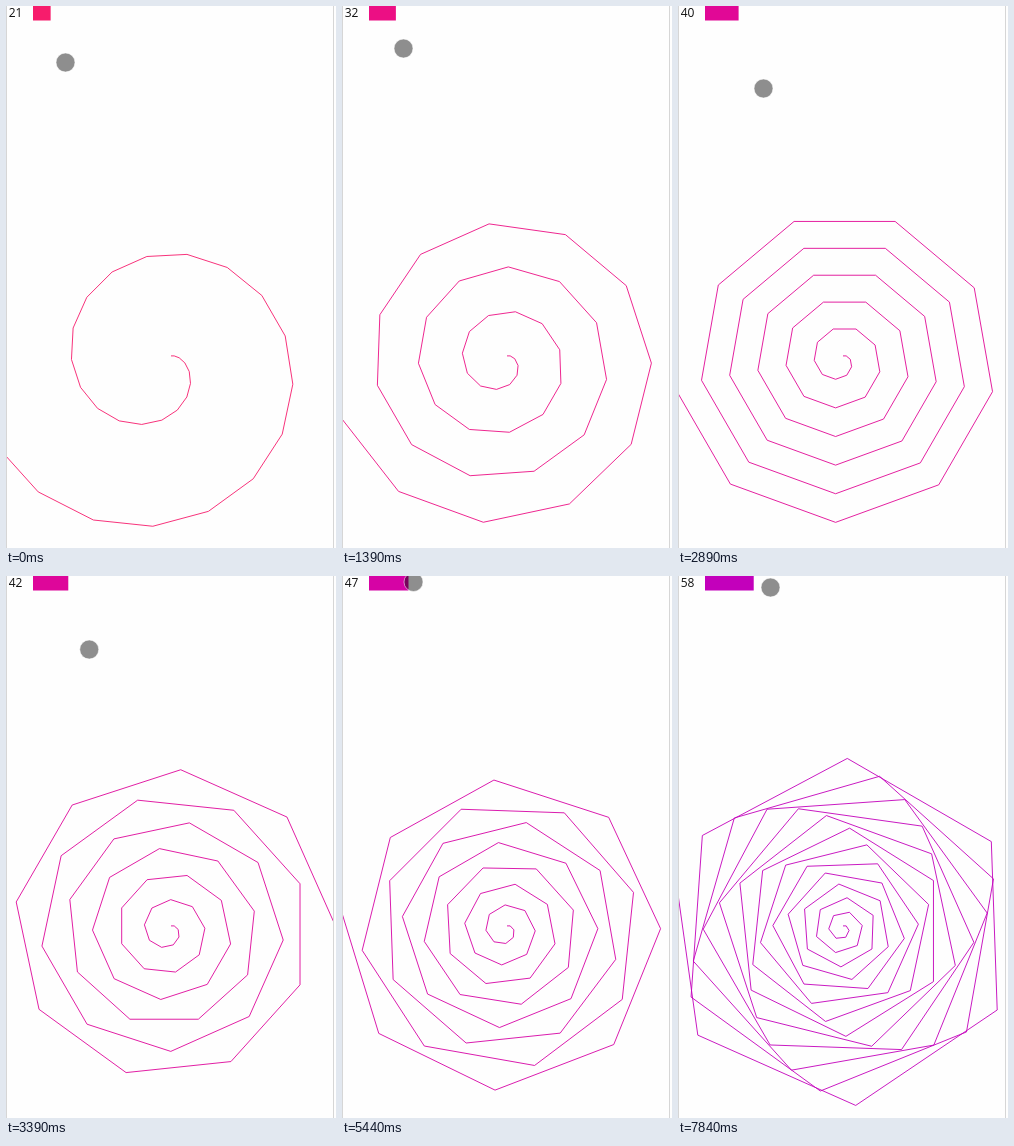
Write an HTML page with a canvas that moves like this. It is 330 px wide and 542 px high and loops after 8 s.

```html
<!DOCTYPE html>
<html>
<head>
<meta charset="utf-8">
<style>
  html, body { margin: 0; width: 100%; height: 100%; overflow: hidden; background: #fff; }
  canvas { display: block; }
</style>
</head>
<body>
<canvas id="stage" width="330" height="542"></canvas>
<script>
const ctx = document.getElementById('stage').getContext('2d');
const LOOP = 8000, STEP = 135, LEFT = 1, RIGHT = 327, HEIGHT = 542;
const START = { x: 165, y: 349.9 }, FIRST = 3.2, GROWTH = 2.175;

// Time (ms), turning angle, pointer x, y
const keys = [
  [0, 21, 59.5, 56.5],
  [120, 21, 66.5, 88],
  [260, 21, 66.5, 88],
  [1390, 32, 61.5, 42.5],
  [2080, 36, 60.5, 14.5],
  [2890, 40, 85.5, 82.5],
  [3940, 45, 79.5, 58.5],
  [4210, 47, 89, 74],
  [4610, 47, 89, 74],
  [5440, 47, 71.5, 6],
  [5830, 47, 62, 7],
  [6100, 47, 62, 7],
  [7840, 58, 92.5, 11.5]
];

// Pose between keys, advancing in held steps of about STEP ms
function pose(time) {
  const i = keys.findLastIndex(k => k[0] <= time);
  const [begin, ...from] = keys[i];
  if (i === keys.length - 1) return from;
  const [end, ...to] = keys[i + 1];
  const count = Math.round((end - begin) / STEP);
  const p = Math.floor((time - begin) / (end - begin) * count) / count;
  return from.map((a, j) => a + (to[j] - a) * p);
}

const rad = deg => deg * Math.PI / 180;

// Sinebow colour, hue running backwards from red
function colour(angle) {
  const channel = deg => Math.round(255 * Math.sin(rad(deg)) ** 2);
  const half = angle / 2;
  return `rgb(${channel(90 - half)},${channel(30 - half)},${channel(30 + half)})`;
}

// Each side is longer than the last and turned by the angle, until it leaves the canvas
function spiral(angle) {
  let { x, y } = START;
  ctx.beginPath();
  ctx.moveTo(x, y);
  for (let i = 0; i < 400 && x > LEFT && x < RIGHT; i++) {
    const length = FIRST + GROWTH * i;
    x += length * Math.cos(rad(angle * i));
    y += length * Math.sin(rad(angle * i));
    ctx.lineTo(x, y);
  }
  ctx.stroke();
}

function pointer(x, y) {
  ctx.beginPath();
  ctx.arc(x, y, 9.5, 0, 2 * Math.PI);
  ctx.fillStyle = 'rgba(0,0,0,.44)';
  ctx.fill();
  ctx.strokeStyle = 'rgba(255,255,255,.6)';
  ctx.stroke();
}

function draw(time) {
  const [value, x, y] = pose(time), angle = Math.round(value);
  ctx.fillStyle = '#fefefe';
  ctx.fillRect(0, 0, 330, HEIGHT);
  ctx.fillStyle = '#d6d6d6';
  ctx.fillRect(0, 0, 1, HEIGHT);
  ctx.fillRect(RIGHT, 0, 1, HEIGHT);

  ctx.save();
  ctx.beginPath();
  ctx.rect(LEFT, 0, RIGHT - LEFT, HEIGHT);
  ctx.clip();
  ctx.lineWidth = 0.9;
  ctx.strokeStyle = ctx.fillStyle = colour(angle);
  spiral(angle);
  ctx.fillRect(27, 0, angle * 0.84, 14.5);
  ctx.fillStyle = '#111';
  ctx.font = '12px "Open Sans", "Noto Sans", sans-serif';
  ctx.fillText(angle, 2.7, 11);
  pointer(x, y);
  ctx.restore();
}

const origin = performance.now();
function tick() {
  draw((performance.now() - origin) % LOOP);
  requestAnimationFrame(tick);
}
tick();
</script>
</body>
</html>
```
